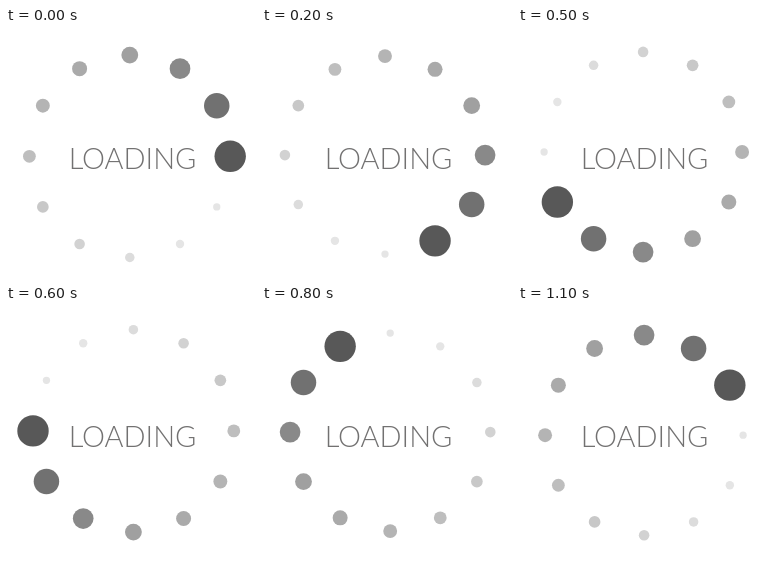
An HTML page that plays this animation: 250 by 250 pixels, repeating every 1200 ms.

```html
<!DOCTYPE html>
<html lang="en">
<head>
<meta charset="utf-8">
<title>Loading</title>
<style>
  html, body { margin: 0; width: 100%; height: 100%; overflow: hidden; background: #fff; }
  svg { display: block; width: 100%; height: 100%; }
  text { font: 300 29px Lato, "Open Sans", sans-serif; fill: #727171; }
</style>
</head>
<body>
<svg viewBox="0 0 250 250">
  <g id="ring"></g>
  <text x="126.5" y="141" text-anchor="middle">LOADING</text>
</svg>
<script>
const STEP = 100, COUNT = 12;
const ring = document.getElementById('ring');

// The ring is slightly oval and off centre; its three poses repeat with every quarter turn
const poses = [
  { dx: -1.8, dy: 1.7, rx: 100.4, ry: 101.2 },
  { dx: 0, dy: 0.9, rx: 98.7, ry: 101.8 },
  { dx: -2.6, dy: 0.5, rx: 100.1, ry: 99 }
];

// Dots shrink and fade fast behind the head, then evenly along the tail
const radius = i => Math.max(15.7 * 0.812 ** i, 9.7 - 0.55 * i);
const grey = i => Math.min(88 + 24.5 * i, 130 + 10 * i, 229);

const dots = Array.from({ length: COUNT }, (_, i) => {
  const dot = document.createElementNS('http://www.w3.org/2000/svg', 'circle');
  const g = grey(i);
  dot.setAttribute('r', radius(i));
  dot.setAttribute('fill', `rgb(${g}, ${g}, ${g})`);
  return ring.appendChild(dot);
});

function draw() {
  const step = Math.floor(performance.now() / STEP) % COUNT;
  const turn = step % poses.length;
  const quarter = Math.floor(step / poses.length);
  const { dx, dy, rx, ry } = poses[turn];
  ring.setAttribute('transform', `translate(125.6 126.6) rotate(${quarter * 90})`);
  dots.forEach((dot, i) => {
    const angle = (turn - i) * 2 * Math.PI / COUNT;
    dot.setAttribute('cx', dx + rx * Math.cos(angle));
    dot.setAttribute('cy', dy + ry * Math.sin(angle));
  });
  requestAnimationFrame(draw);
}
draw();
</script>
</body>
</html>
```
